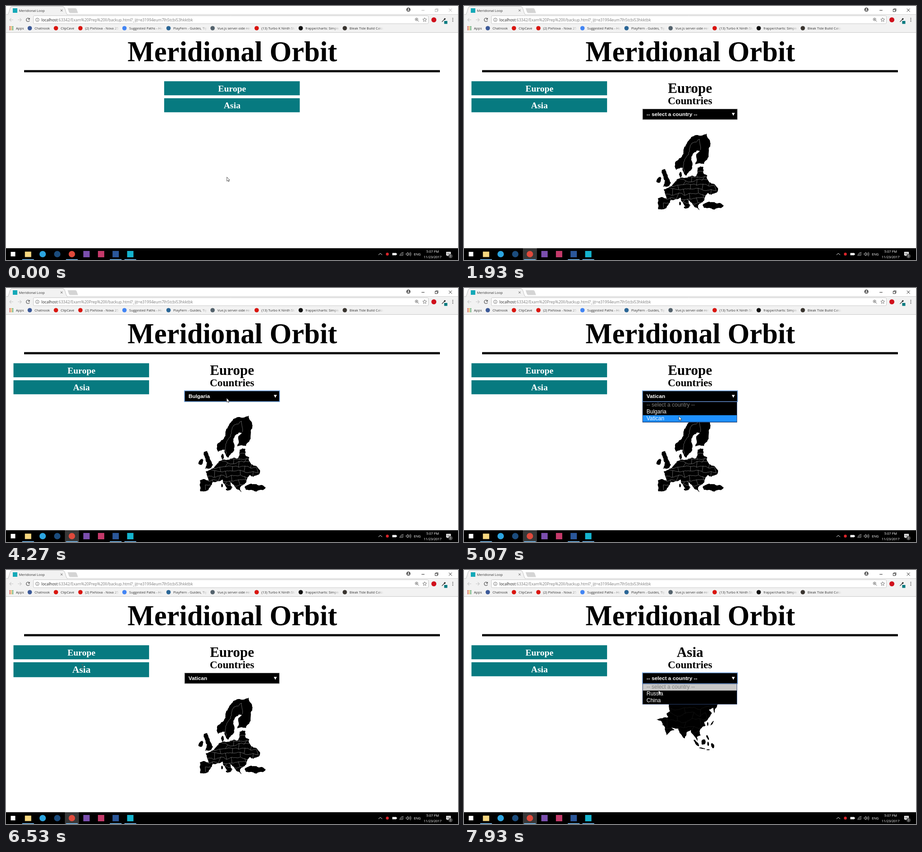
These frames come from a looping animation (998x561 px, 8 s). An HTML page with a canvas:

```html
<!DOCTYPE html>
<html lang="en">
<head>
<meta charset="utf-8">
<title>Meridional Loop</title>
<style>
html, body { margin: 0; width: 100%; height: 100%; overflow: hidden; background: #fff; }
canvas { display: block; width: 998px; height: 561px; }
</style>
</head>
<body>
<canvas id="stage"></canvas>
<script>
const W = 998, H = 561, LOOP = 8000;
const canvas = document.getElementById('stage');
const ctx = canvas.getContext('2d');
const dpr = window.devicePixelRatio || 1;
canvas.width = Math.round(W * dpr);
canvas.height = Math.round(H * dpr);

const UI = '"Open Sans", "Noto Sans", sans-serif';
const SMALL = '7.5px ' + UI;
const SERIF = '"Liberation Serif", "Times New Roman", serif';
const SANS = '"Liberation Sans", Arial, sans-serif';
const TEAL = '#077a80';

function rect(x, y, w, h, color) {
  ctx.fillStyle = color;
  ctx.fillRect(x, y, w, h);
}
function frame(x, y, w, h, color, line = 0.8) {
  ctx.strokeStyle = color;
  ctx.lineWidth = line;
  ctx.strokeRect(x, y, w, h);
}
function disc(x, y, r, color) {
  ctx.fillStyle = color;
  ctx.beginPath();
  ctx.arc(x, y, r, 0, 7);
  ctx.fill();
}
function arc(x, y, r, color, line = 0.9, from = 0, to = Math.PI * 2) {
  ctx.strokeStyle = color;
  ctx.lineWidth = line;
  ctx.beginPath();
  ctx.arc(x, y, r, from, to);
  ctx.stroke();
}
function fill(d, color) {
  ctx.fillStyle = color;
  ctx.fill(new Path2D(d));
}
function stroke(d, color, line = 0.9) {
  ctx.strokeStyle = color;
  ctx.lineWidth = line;
  ctx.stroke(new Path2D(d));
}
function cross(x, y, r, color) {
  stroke(`M${x - r} ${y - r}L${x + r} ${y + r}M${x + r} ${y - r}L${x - r} ${y + r}`, color);
}
function text(s, x, y, font, color, align = 'left') {
  ctx.font = font;
  ctx.fillStyle = color;
  ctx.textAlign = align;
  ctx.fillText(s, x, y);
}

// Maps: a few corners joined by rough coasts
let seed = 11;
const random = () => (seed = seed * 16807 % 2147483647) / 2147483647;

function coastTo(path, ax, ay, bx, by) {
  const dx = bx - ax, dy = by - ay;
  if (Math.hypot(dx, dy) < 3.5) return path.lineTo(bx, by);
  const k = (random() - 0.5) * 0.3;
  const mx = (ax + bx) / 2 - dy * k, my = (ay + by) / 2 + dx * k;
  coastTo(path, ax, ay, mx, my);
  coastTo(path, mx, my, bx, by);
}
function coast(points, closed = true) {
  const path = new Path2D();
  path.moveTo(...points[0]);
  points.slice(1).forEach((p, i) => coastTo(path, ...points[i], ...p));
  if (closed) coastTo(path, ...points[points.length - 1], ...points[0]);
  return path;
}
function island(x, y, rx, ry, tilt = 0) {
  const c = Math.cos(tilt), s = Math.sin(tilt);
  return coast(Array.from({ length: 8 }, (_, i) => {
    const a = i * Math.PI / 4, k = 0.85 + random() * 0.3;
    const u = rx * Math.cos(a) * k, v = ry * Math.sin(a) * k;
    return [x + u * c - v * s, y + u * s + v * c];
  }));
}
// Jittered brick pattern that stands for the inner borders
function borders(x, y, cols, rows, w, h) {
  const path = new Path2D();
  const spots = Array.from({ length: rows + 1 }, (_, r) => Array.from({ length: cols }, (_, c) =>
    [x + (c + random() * 0.6) * w, y + (r + random() * 0.7) * h]));
  for (let r = 0; r < rows; r++)
    for (let c = 0; c < cols; c++) {
      if (c) coastTo(path, ...spots[r][c - 1], ...spots[r][c]);
      else path.moveTo(...spots[r][c]);
      if ((r + c) % 2) {
        path.lineTo(...spots[r + 1][c]);
        path.moveTo(...spots[r][c]);
      }
    }
  return path;
}

const EUROPE = {
  main: coast([[428, 425], [448, 425], [441, 405], [458, 398], [471, 382], [480, 379], [510, 377], [516, 357],
    [528, 355], [529, 370], [537, 374], [541, 389], [561, 403], [558, 412], [546, 417], [538, 413], [530, 430],
    [517, 440], [520, 451], [511, 445], [489, 421], [500, 440], [494, 447], [478, 423], [456, 429], [446, 447], [429, 449]]),
  more: [
    coast([[466, 346], [484, 327], [494, 299], [513, 285], [536, 282], [540, 327], [530, 349], [511, 350],
      [521, 320], [514, 319], [502, 333], [504, 358], [490, 375], [483, 357], [468, 362]]),
    coast([[437, 362], [444, 360], [457, 391], [454, 396], [439, 399], [444, 386], [439, 374]]),
    island(430.5, 384, 4.5, 8, 0.4), island(549, 440, 25, 8), island(478, 372, 3, 6), island(477, 436, 2, 4), island(489, 445, 4, 2.5)
  ],
  inner: borders(440, 362, 9, 8, 14, 10),
  ridge: coast([[486, 367], [490, 335], [503, 303], [520, 294], [522, 318]], false),
  ink: '#999'
};
const ASIA = {
  main: coast([[452, 297], [474, 287], [492, 281], [512, 288], [546, 291], [560, 297], [553, 316], [550, 304],
    [541, 308], [547, 317], [530, 336], [533, 344], [520, 356], [522, 366], [514, 369], [516, 379], [501, 353],
    [492, 358], [487, 372], [473, 350], [458, 347], [465, 353], [447, 365], [436, 334], [425, 330], [451, 325], [447, 318], [455, 312]]),
  more: [
    island(513, 382, 10, 2.5, 0.95), island(526, 394, 7, 1.3, 0.2), island(529, 380, 5, 6, 0.5), island(539, 384, 2, 5),
    island(538, 370, 2, 6, -0.4), island(549, 388, 3.5, 6, -0.4), island(539, 397, 4, 1), island(548, 338, 6, 1.5, -1), island(538, 340, 1.5, 4)
  ],
  inner: borders(430, 300, 7, 5, 17, 14),
  ink: '#1c1c1c'
};
function land(map) {
  ctx.fillStyle = '#000';
  map.more.forEach(p => ctx.fill(p));
  ctx.strokeStyle = map.ink;
  ctx.lineWidth = 0.65;
  if (map.ridge) ctx.stroke(map.ridge);
  ctx.fill(map.main);
  ctx.save();
  ctx.clip(map.main);
  ctx.stroke(map.inner);
  ctx.restore();
}

// Browser window
const LINKS = [
  ['Chatnook', '#3b5998'], ['ClipCave', '#d9150f'], ['(2) PixNova - Nova 25', '#d9150f'],
  ['Suggested Paths - Home', '#4285f4'], ['PlayFern - Guides, Tips', '#2a6696'],
  ['Vue.js server-side rendering', '#54626c'], ['(13) Turbo K Ninth Stage', '#d9150f'],
  ['frappe/charts: Simple, resp', '#111'], ['Bleak Tide Build Calculator', '#39342f']
];
function links() {
  const dots = ['#d8453a', '#e8a52b', '#3c9f56'];
  for (let i = 0; i < 9; i++)
    rect(7.5 + i % 3 * 3.2, 44.7 + Math.floor(i / 3) * 3.2, 2.2, 2.2, dots[i % 3]);
  text('Apps', 22, 52, SMALL, '#333');
  let x = 63;
  for (const [label, color] of LINKS) {
    disc(x - 10.5, 49, 4.8, color);
    const fade = ctx.createLinearGradient(x, 0, x + 75, 0);
    fade.addColorStop(0.8, '#333');
    fade.addColorStop(1, 'rgba(51,51,51,0)');
    text(label, x, 52, SMALL, fade);
    x += Math.min(73.3, ctx.measureText(label).width) + 24;
  }
}

function navArrow(x, dir) {
  stroke(`M${x - 4 * dir} 30.500h${8 * dir}m${-3.5 * dir} -3.500l${3.5 * dir} 3.500l${-3.5 * dir} 3.500`, '#c9c9c9', 1.1);
}
function star(x, y, r) {
  ctx.beginPath();
  for (let i = 0; i < 10; i++) {
    const a = (i / 5 - 0.5) * Math.PI, k = i % 2 ? r * 0.45 : r;
    ctx.lineTo(x + k * Math.cos(a), y + k * Math.sin(a));
  }
  ctx.closePath();
  ctx.strokeStyle = '#555';
  ctx.lineWidth = 0.8;
  ctx.stroke();
}

function windowButtons(active) {
  const ink = active ? '#111' : '#a6a6a6';
  disc(888.5, 8, 4.5, '#4c4c4c');
  disc(888.5, 6.7, 1.5, '#fff');
  rect(886.3, 9, 4.4, 1.6, '#fff');
  stroke('M917.500 9.500h6.500', ink);
  frame(947.5, 7.5, 5, 5, ink);
  stroke('M949 7.500V6h5v5h-1.500', ink, 0.8);
  cross(981.2, 9.2, 3.4, ink);
}

function toolbar() {
  navArrow(12, -1);
  navArrow(30, 1);
  arc(48.5, 30.5, 3.8, '#555', 1.2, 0.4, 5.6);
  fill('M52.500 26v4h-4z', '#555');

  ctx.beginPath();
  ctx.roundRect(60.5, 21.5, 872, 17.5, 2);
  ctx.fillStyle = '#fff';
  ctx.fill();
  ctx.strokeStyle = '#bdbdbd';
  ctx.lineWidth = 0.8;
  ctx.stroke();
  arc(69.2, 30.5, 3.8, '#555', 0.8);
  rect(68.8, 29.8, 0.8, 2.8, '#555');
  rect(68.8, 28.2, 0.8, 0.9, '#555');
  const font = '8.6px ' + UI;
  text('localhost', 78, 33.5, font, '#222');
  text(':63342/Exam%20Prep%20II/backup.html?_ijt=e31994eum7lh5tcbi53hkktbk',
    78 + ctx.measureText('localhost').width, 33.5, font, '#7b7b7b');

  arc(906.5, 29.5, 3, '#555');
  stroke('M908.700 31.700l2.800 2.800M905 29.500h3M906.500 28v3', '#555');
  star(924.5, 30.5, 4.6);
  disc(944.7, 30.5, 5.5, '#d0101c');
  stroke('M962.500 35l5 -5', '#444', 1.5);
  stroke('M967.500 30l2.500 -2.500', '#222', 3);
  rect(967.5, 33, 7, 6.5, TEAL);
  for (let i = -1; i < 2; i++) disc(986.5, 30.5 + i * 3.2, 1, '#555');
}

function browser(active) {
  rect(0, 19, W, 40, '#f2f2f2');
  rect(0, 18.5, W, 0.7, '#bcbcbc');
  const tab = 'M3 19.500C8 17 7 0.500 14 0.500H124C132 0.500 131 17 136 19.500';
  fill(tab, '#f2f2f2');
  stroke(tab, '#b0b0b0', 0.8);
  fill('M136 5h17q2 0 3 2l3 8.500h-17q-2 0 -3 -2z', '#d4d4d4');
  rect(15, 5, 10, 10, '#14a9b8');
  text('Meridional Loop', 28.5, 12.5, SMALL, '#333');
  cross(122.7, 9.8, 2.2, '#555');
  windowButtons(active);
  toolbar();
  links();
  rect(0, 58, W, 0.8, '#bdbdbd');
}

const APPS = ['#f5d77f', '#2ca5e0', '#1b4c7d', '#df4a3c', '#7b4fae', '#c43a6a', '#2b579a', '#14b4cf'];
const RUNNING = [0, 3, 6, 7];

function taskbar(active) {
  rect(0, 535, W, 26, '#000');
  if (active) rect(130, 535, 31, 26, '#383838');
  rect(10.5, 543, 10, 10, '#fff');
  APPS.forEach((color, i) => {
    const x = 48.7 + i * 32.25;
    if (i > 0 && i < 4) disc(x, 548, 7.1, color);
    else rect(x - 7, i ? 541 : 542.5, 14, i ? 14 : 12, color);
    if (RUNNING.includes(i)) rect(x - 13, 559.3, 26, 1.7, '#76b9ed');
  });

  stroke('M822.500 550l4 -4l4 4', '#fff', 1);
  disc(842, 548, 3.2, '#d9252a');
  rect(853, 545.5, 9, 5, '#fff');
  rect(862, 547, 1.2, 2, '#fff');
  for (let i = 1; i < 4; i++) {
    arc(877.5, 552, i * 2.6, '#ccc', 1, Math.PI, Math.PI * 1.5);
    arc(887, 548, i * 2.4, '#eee', 0.8, -0.7, 0.7);
  }
  stroke('M883.500 546.500h1.500l2.500 -2.500v8l-2.500 -2.500h-1.500z', '#eee', 0.8);
  text('ENG', 900.5, 551, SMALL, '#fff');
  text('5:07 PM', 942, 544.5, SMALL, '#fff', 'center');
  text('11/23/2017', 942, 556.5, SMALL, '#fff', 'center');
  fill('M972 543h10v8h-5.500l-2 2v-2h-2.500z', '#fff');
  for (let i = 0; i < 3; i++) rect(973.5, 545 + i * 1.7, 7, 0.6, '#333');
  disc(981.5, 552.5, 4.6, '#4a4a4a');
  text('1', 981.5, 555, '6.5px ' + UI, '#fff', 'center');
}

// Pointer moves: from time, to time, end x, end y
const MOVES = [
  [0, 330, 472.5, 339], [470, 1700, 500.5, 184.5], [2270, 2930, 491.7, 243.5],
  [3200, 3600, 489, 270], [3870, 4270, 486.7, 242.7], [4400, 4800, 474, 283],
  [5330, 6330, 169, 213], [6600, 7330, 432, 240], [7400, 7930, 429.3, 265.5]
];
function pointer(t) {
  let x = 487.3, y = 377.5;
  for (const [from, to, endX, endY] of MOVES) {
    const u = Math.max(0, Math.min(1, (t - from) / (to - from)));
    const e = u * u * (3 - 2 * u);
    x += (endX - x) * e;
    y += (endY - y) * e;
  }
  return { x, y };
}
function drawPointer({ x, y }, beam) {
  ctx.save();
  ctx.translate(x, y);
  if (beam) {
    stroke('M-2.500 -4.500h5M0 -4.500v9M-2.500 4.500h5', '#666');
  } else {
    const arrow = 'M0.400 0.300v9.100l2.100 -1.900l1.500 3.100l1.500 -0.700l-1.400 -2.900h2.600z';
    fill(arrow, '#fff');
    stroke(arrow, '#222', 0.75);
  }
  ctx.restore();
}

// Page
const inside = (p, x, y, w, h) => p.x >= x && p.x < x + w && p.y >= y && p.y < y + h;

function buttons(x, p) {
  let y = 166.2, beam = false;
  for (const label of ['Europe', 'Asia']) {
    const hover = inside(p, x, y, 300, 31);
    const h = hover ? 33 : 31;
    rect(x, y, 299.4, h, TEAL);
    text(label, x + 150, y + (hover ? 23.5 : 22.3), `bold ${hover ? 21.5 : 19.6}px ${SERIF}`, '#fff', 'center');
    beam ||= hover && Math.abs(p.x - x - 150) < ctx.measureText(label).width / 2;
    y += h + 6.5;
  }
  return beam;
}

function select(value, focus, open, names, p) {
  rect(394.5, 227.5, 209, 23.3, '#000');
  if (focus) frame(394, 227, 210, 24, '#6a9fe0', 1.5);
  else frame(394.5, 227.5, 209, 23.3, '#8a8a8a');
  text(value, 403, 243, `bold 11.8px ${SANS}`, '#fff');
  fill('M591.300 236h6.700l-3.350 6.500z', '#fff');
  if (!open) return;

  const top = 251.6, row = 14.7;
  rect(394.3, top, 208.7, row * 3 + 1, '#000');
  const over = Math.floor((p.y - top) / row);
  const hot = over > 0 ? over : names.indexOf(value);
  names.forEach((name, i) => {
    const y = top + row * i;
    if (i === hot) rect(395, y, 207.5, row, i ? '#1e90ff' : '#c8c8c8');
    text(name, 403, y + 10.7, `12px ${SANS}`, i ? '#fff' : '#808080');
  });
  frame(394.3, top - 0.3, 208.4, row * 3 + 1, '#34528c');
}

const PROMPT = '-- select a country --';
const between = (t, a, b) => t >= a && t < b;

function content(t, p) {
  const asia = t >= 6600;
  text(asia ? 'Asia' : 'Europe', 499, 192.3, `bold 31px ${SERIF}`, '#000', 'center');
  text('Countries', 499, 217, `bold 23.2px ${SERIF}`, '#000', 'center');
  if (t >= 1930) land(asia ? ASIA : EUROPE);

  const value = asia || t < 3800 ? PROMPT : t < 5070 ? 'Bulgaria' : 'Vatican';
  const focus = between(t, 3070, 6530) || t >= 7400;
  const open = between(t, 3130, 3870) || between(t, 4330, 5130) || t >= 7470;
  select(value, focus, open, asia ? [PROMPT, 'Russia', 'China'] : [PROMPT, 'Bulgaria', 'Vatican'], p);
  return inside(p, 450, 170, 98, 50);
}

function draw(t) {
  const p = pointer(t), active = t >= 1800, chosen = t >= 1870;
  ctx.setTransform(dpr, 0, 0, dpr, 0, 0);
  rect(0, 0, W, H, '#fff');
  browser(active);
  taskbar(active);
  text('Meridional Orbit', 499.7, 122, `bold 62.4px ${SERIF}`, '#000', 'center');
  rect(40, 141.6, 918, 4.8, '#000');
  let beam = buttons(chosen ? 16.5 : 349.2, p);
  if (chosen) beam = content(t, p) || beam;
  drawPointer(p, beam);
}

const start = performance.now();
function tick() {
  const t = (performance.now() - start) % LOOP;
  const step = Math.floor((t + 3.4) * 15 / 1000) % 120;
  draw(Math.round(step * 20 / 3) * 10);
  requestAnimationFrame(tick);
}
tick();
</script>
</body>
</html>
```
